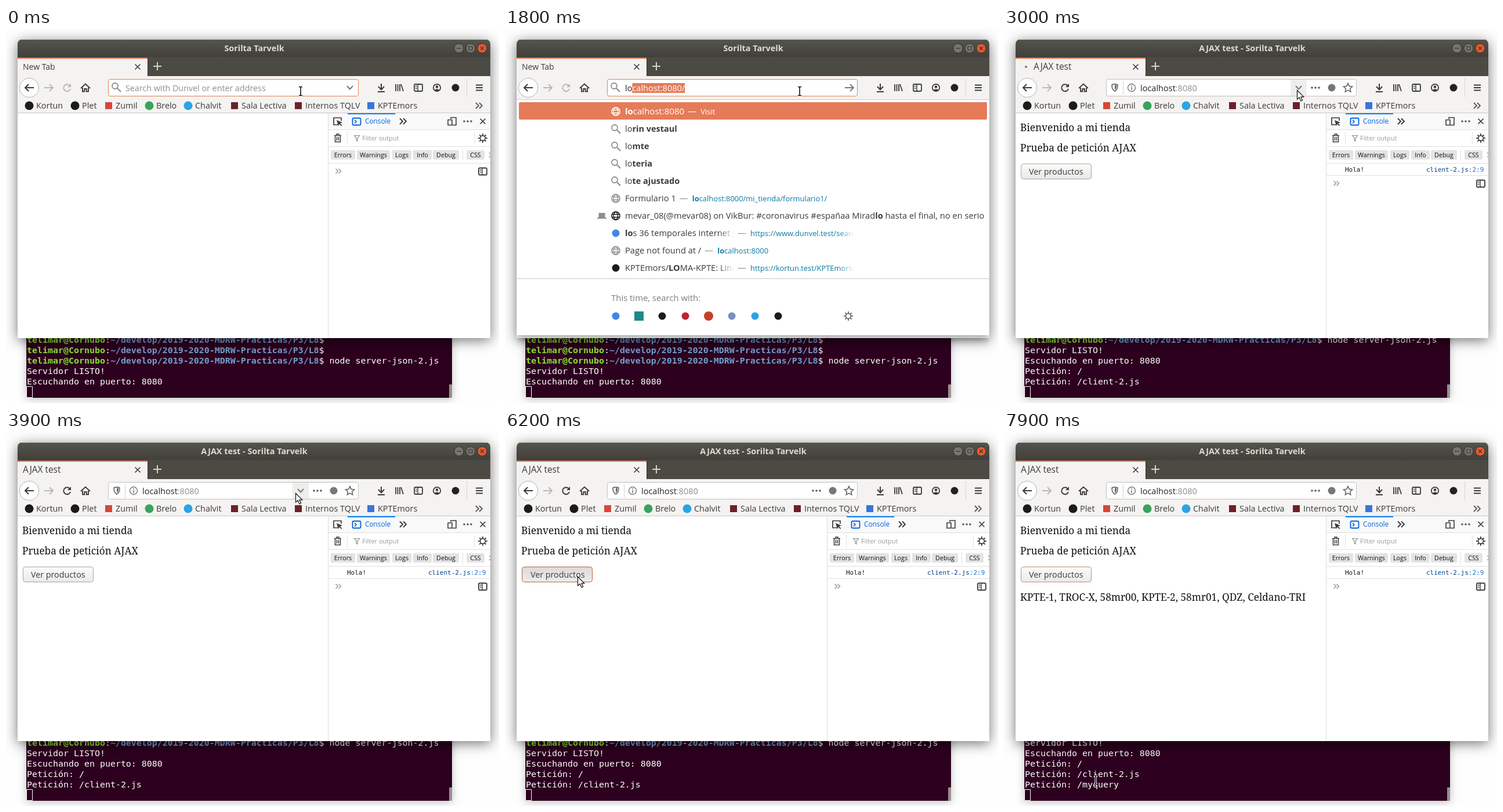
These frames come from a looping animation (850x647 px, 8000 ms). An HTML page with a canvas:

```html
<!DOCTYPE html>
<html lang="en">
<head>
<meta charset="utf-8">
<title>Browser request demo</title>
<style>
html, body { margin: 0; width: 100%; height: 100%; overflow: hidden; background: #fefefe; }
canvas { display: block; }
</style>
</head>
<body>
<canvas id="stage" width="850" height="647"></canvas>
<script>
const c = document.getElementById('stage').getContext('2d');
const LOOP = 8000;
const UI = '"Open Sans", "Noto Sans", sans-serif';
const MONO = '"DejaVu Sans Mono", monospace';
const SERIF = '"Noto Serif", serif';
const INK = '#3b3b3b', GREY = '#8d8d8d', ORANGE = '#e57b58', LINK = '#0b79a5';
const APP = 'Sorilta Tarvelk';

// ---- helpers ----
// Text is centred on y; returns the x where it ends.
function text(s, x, y, size = 14.5, color = INK, weight = 400, font = UI) {
  c.font = `${weight} ${size}px ${font}`;
  c.fillStyle = color;
  c.fillText(s, x, Math.round(y + size * .355));
  return x + c.measureText(s).width;
}
function rect(x, y, w, h, color) {
  c.fillStyle = color;
  c.fillRect(x, y, w, h);
}
function box(x, y, w, h, r, fill, stroke, lw = 1) {
  c.beginPath();
  c.roundRect(x, y, w, h, r);
  if (fill) { c.fillStyle = fill; c.fill(); }
  if (stroke) { c.strokeStyle = stroke; c.lineWidth = lw; c.stroke(); }
}
function disc(x, y, r, fill, stroke, lw = 1) {
  c.beginPath();
  c.arc(x, y, r, 0, 7);
  if (fill) { c.fillStyle = fill; c.fill(); }
  if (stroke) { c.strokeStyle = stroke; c.lineWidth = lw; c.stroke(); }
}
function line(d, x, y, color = INK, lw = 2) {
  c.save();
  c.translate(x, y);
  c.strokeStyle = color;
  c.lineWidth = lw;
  c.stroke(new Path2D(d));
  c.restore();
}
function shape(d, x, y, color) {
  c.save();
  c.translate(x, y);
  c.fillStyle = color;
  c.fill(new Path2D(d));
  c.restore();
}
function clipped(x, y, w, h, draw) {
  c.save();
  c.beginPath();
  c.rect(x, y, w, h);
  c.clip();
  draw();
  c.restore();
}
function vgrad(y0, y1, a, b) {
  const g = c.createLinearGradient(0, y0, 0, y1);
  g.addColorStop(0, a);
  g.addColorStop(1, b);
  return g;
}
function fadeRight(x, y, w) {
  const g = c.createLinearGradient(x - w, 0, x, 0);
  g.addColorStop(0, 'rgba(255,255,255,0)');
  g.addColorStop(1, '#fff');
  rect(x - w, y - 13, w, 26, g);
}
function shadowed(blur, dy, color, draw) {
  c.save();
  c.shadowBlur = blur;
  c.shadowOffsetY = dy;
  c.shadowColor = color;
  draw();
  c.restore();
}
// Text whose matches of term are bold.
function marked(s, term, x, y, size, color) {
  for (const part of s.split(new RegExp(`(${term})`, 'gi')))
    if (part) x = text(part, x, y, size, color, part.toLowerCase() === term ? 700 : 400);
  return x;
}

// ---- icons ----
const CROSS = 'M-4.5 -4.5L4.5 4.5M4.5 -4.5L-4.5 4.5';
const CHEVRON = 'M-5 -3L0 2.5L5 -3';
const MORE = 'M-5 -5L0 0L-5 5M1 -5L6 0L1 5';
const ARROW = 'M-7 0H8M2 -6L8 0L2 6';
function globe(x, y, color) {
  disc(x, y, 7, null, color, 1.6);
  line('M-7 -2.5H7M-7 2.5H7M0 -7C-5 -3 -5 3 0 7C5 3 5 -3 0 -7', x, y, color, 1.3);
}
function lens(x, y) {
  disc(x - 2, y - 2, 5, null, GREY, 1.8);
  line('M2 2L8 8', x, y, GREY, 2.2);
}
function gear(x, y, color) {
  for (let i = 0; i < 8; i++) {
    const a = i * Math.PI / 4, u = Math.cos(a), v = Math.sin(a);
    line(`M${u * 4} ${v * 4}L${u * 8} ${v * 8}`, x, y, color, 1.8);
  }
  disc(x, y, 4.4, null, color, 1.6);
}
function dots(x, y, r = 1.8) {
  for (const dx of [-6, 0, 6]) disc(x + dx, y, r, '#5a5a5a');
}
function sidebar(x, y) {
  box(x - 7, y - 6, 14, 12, 2, null, INK, 1.8);
  line('M-1 -6V6M-5 -2.5H-2.5M-5 1H-2.5', x, y, INK, 1.4);
}
function star(x, y, r, fill, stroke) {
  c.beginPath();
  for (let i = 0; i < 10; i++) {
    const a = i * Math.PI / 5 - Math.PI / 2, q = i % 2 ? r * .48 : r;
    c.lineTo(x + q * Math.cos(a), y + q * Math.sin(a));
  }
  c.closePath();
  if (fill) { c.fillStyle = fill; c.fill(); }
  else { c.strokeStyle = stroke; c.lineWidth = 1.6; c.stroke(); }
}
function square(x, y, color, r = 6.5) { rect(x - r, y - r, 2 * r, 2 * r, color); }

// ---- terminal ----
const PROMPT = ['telimar@Cornubo', ':', '~/develop/2019-2020-MDRW-Practicas/P3/L8', '$'];
const LOG = ['$', '$', '$ node server-json-2.js', 'Servidor LISTO!', 'Escuchando en puerto: 8080',
  'Petición: /', 'Petición: /client-2.js', 'Petición: /myquery'];

function terminal(t) {
  shadowed(14, 2, 'rgba(0,0,0,.25)', () => rect(35, 500, 734, 138, '#2c001e'));
  const end = t < 2700 ? 5 : t < 6400 ? 7 : 8;
  LOG.slice(end - 5, end).forEach((s, i) => {
    const y = 538 + 18 * i, put = (q, x, col, w) => text(q, x, y, 14.95, col, w, MONO);
    if (s[0] !== '$') return put(s, 36, '#fff');
    let x = put(PROMPT[0], 36, '#8ae234', 700);
    x = put(PROMPT[1], x, '#fff');
    x = put(PROMPT[2], x, '#729fcf', 700);
    put(s, x, '#fff');
  });
  box(35.5, 618.5, 10, 19, 0, null, '#fff');
  rect(764, 615, 5, 23, '#96908f');
}

// ---- browser chrome ----
function frame(t) {
  const loaded = t >= 2700;
  shadowed(22, 4, 'rgba(0,0,0,.55)', () => box(20, 20, 815, 515, [7, 7, 0, 0], '#fff'));
  box(20, 20, 815, 31, [7, 7, 0, 0], vgrad(20, 50, '#55544c', '#403f3a'));
  rect(24, 20, 807, 1, '#65645d');
  rect(20, 50, 815, 33, '#4b4a43');
  c.textAlign = 'center';
  text(loaded ? 'AJAX test - ' + APP : APP, 428, 35, 14.4, '#dfdbd2', 700);
  c.textAlign = 'left';
  ['M-4 0H4', 'M-3 -3H3V3H-3Z', 'M-3 -3L3 3M3 -3L-3 3'].forEach((d, i) => {
    disc(781 + 20 * i, 35, 8, i < 2 ? '#77756d' : '#e95a31', '#34332f');
    line(d, 781 + 20 * i, 35, '#34332f', 1.2);
  });

  rect(20, 51, 224, 32, '#f4f3f1');
  rect(20, 51, 224, 2, '#e6724a');
  rect(244, 52, 1, 31, '#37362f');
  if (!loaded) text('New Tab', 29, 67, 14);
  else if (t < 3300) {
    disc(32 + (t - 2700) / 50, 67, 2, '#777');
    text('AJAX test', 51, 67, 15.4);
  } else text('AJAX test', 29, 67, 15.4);
  line(CROSS, 227, 67, INK, 1.6);
  line('M-7 0H7M0 -7V7', 261, 66, '#d6d3cb', 2);

  rect(20, 83, 815, 64, '#f4f3f1');
  disc(40, 103, 16.5, '#fff', '#b5b2ad');
  line('M8 0H-7M-1 -6L-7 0L-1 6', 40, 103);
  line(ARROW, 73, 103, '#b9b8b5');
  const reload = loaded ? INK : '#b9b8b5';
  line('M5 -3.5A6 6 0 1 0 6 2', 105, 103, reload);
  shape('M7 -7V-1H1Z', 105, 103, reload);
  line('M-8 1L0 -6.5L8 1M-5 0V6.5H-1.7V2H1.7V6.5H5V0', 137, 103, INK, 1.9);

  line('M0 -7V3M-5 -2L0 3.5L5 -2M-6 7H6', 647, 103);
  line('M-6 -6V6M-2.5 -6V6M1 -6V6M3 -6L7 6', 678, 103, INK, 1.8);
  sidebar(711, 103);
  disc(743, 103, 6.2, null, INK, 1.8);
  disc(743, 101.5, 2.3, INK);
  shape('M-4.5 4.5Q0 0 4.5 4.5Q0 8 -4.5 4.5', 743, 103, INK);
  disc(775, 103, 6.5, '#222');
  rect(794, 87, 1, 32, '#d9d7d3');
  line('M-6 -4.5H6M-6 0H6M-6 4.5H6', 816, 103, INK, 1.8);

  const marks = [
    ['Kortun', 40, '#1b1b1b', 1], ['Plet', 119, '#1b1b1b', 1], ['Zumil', 177, '#d8463a'],
    ['Brelo', 247, '#39a35b', 1], ['Chalvit', 314, '#2ba3e4', 1], ['Sala Lectiva', 394, '#6e2028'],
    ['Internos TQLV', 504, '#6e2028'], ['KPTEmors', 629, '#3a74d8']];
  for (const [name, x, color, round] of marks) {
    if (round) disc(x, 134, 7.5, color);
    else square(x, 134, color, 6);
    text(name, x + 12, 134, 14.4);
  }
  line(MORE, 815, 134, '#5a5a5a', 1.8);
  rect(20, 146, 815, 1, '#cbc8c3');
}

function urlbar(t) {
  const loaded = t >= 2700;
  box(176.5, 88.5, 431, 29, 3, '#fff', loaded ? '#c4c1bc' : '#dd8058');
  if (loaded) {
    shape('M-5.5 -6Q0 -8 5.5 -6Q7 3 0 7Q-7 3 -5.5 -6', 191, 103, '#6b6b6b');
    shape('M-3.8 -4.6Q0 -6 3.8 -4.6Q4.7 2 0 5Q-4.7 2 -3.8 -4.6', 191, 103, '#fff');
    shape('M0 -4.6Q2 -5 3 -4.2Q3.6 1.8 0 3.8Z', 191, 103, '#6b6b6b');
    rect(205, 92, 1, 23, '#d0d0d0');
    disc(220, 103, 6.5, null, '#777', 1.4);
    line('M0 -1V4M0 -4V-2.3', 220, 103, '#777', 1.6);
    const x = text('localhost', 235, 104, 14.5, '#222');
    text(':8080', x, 104, 14.5, GREY);
    if (t < 4000) {
      rect(494, 89, 28, 28, '#eeeeec');
      line(CHEVRON, 508, 103, '#777');
    }
    dots(537, 103);
    disc(565, 103, 6.5, '#777');
    star(593, 103.5, 8, null, '#666');
    return;
  }
  lens(190, 102);
  if (t < 1200) {
    text('Search with Dunvel or enter address', 206, 104, 14.3, '#8f8f8f');
    line(CHEVRON, 593, 103, '#777');
    if (t >= 1000) rect(207, 95, 1, 17, '#111');
    return;
  }
  const typed = t < 1400 ? 'l' : 'lo', rest = 'localhost:8080/'.slice(typed.length);
  const x = text(typed, 207, 104, 14.5, '#222');
  rect(x, 95, c.measureText(rest).width, 17, ORANGE);
  text(rest, x, 104, 14.5, '#fff');
  line(ARROW, 593, 103, '#777', 1.8);
}

// ---- devtools and page ----
function devtools(t) {
  rect(555, 147, 1, 388, '#dcdcdf');
  rect(556, 147, 279, 28, '#f9f9fa');
  for (const y of [175, 204, 233]) rect(556, y, 279, 1, '#e0e0e2');
  line('M1 6H-7V-6H6V-1', 572, 161, INK, 1.7);
  shape('M-2 -2L8 2L4 3.5L7.5 7L6 8L2.5 4.8L1 8Z', 572, 161, INK);
  rect(589, 147, 82, 2, '#0a84ff');
  box(597.5, 155.5, 14, 12, 2, null, '#0060df', 1.8);
  line('M-3 -3L0 0L-3 3', 604, 161.5, '#0060df', 1.6);
  text('Console', 619, 161, 11.8, '#0060df');
  line(MORE, 684, 161, INK, 1.9);
  line('M-2 -4V-6.5H7V6.5H1M-7 -2.5H0V6.5H-7Z', 769, 161, INK, 1.6);
  dots(796, 161);
  line(CROSS, 822, 161, INK, 1.7);

  line('M-6 -4.5H6M-2 -5V-7H2V-5M-4.5 -4V6.5H4.5V-4M-1.5 -2V4M1.5 -2V4', 572, 190, INK, 1.5);
  rect(588, 179, 1, 22, '#e0e0e2');
  line('M-4.5 -4.5H4.5L1 0V5L-1 4V0Z', 605, 190, GREY, 1.2);
  text('Filter output', 614, 190, 11, '#9b9b9b');
  rect(807, 179, 1, 22, '#e0e0e2');
  gear(822, 190, INK);

  const tags = [['Errors', 560, 42], ['Warnings', 605, 57], ['Logs', 666, 33], ['Info', 702, 32],
    ['Debug', 736, 45], ['CSS', 794, 31]];
  c.textAlign = 'center';
  for (const [s, x, w] of tags) {
    box(x, 211, w, 16, 2, '#e3e3e5');
    text(s, x + w / 2, 219, 10.7, '#111');
  }
  c.textAlign = 'left';
  rect(787, 209, 1, 20, '#e0e0e2');
  line('M0 -4L2 -2M0 4L2 2', 833, 219, '#555', 1);

  const logged = t >= 2900, y = logged ? 268 : 247;
  if (logged) {
    text('Hola!', 588, 244, 11, '#111', 400, MONO);
    const x = text('client-2.js', 728, 244, 11, '#00408f', 400, MONO);
    text(':2:9', x, 244, 11, '#1571d8', 400, MONO);
    rect(556, 254, 279, 1, '#e0e0e2');
  }
  line('M-4.5 -4L-.5 0L-4.5 4M.5 -4L4.5 0L.5 4', 573, y, '#999', 1.5);
  sidebar(822, y + .5);
}

function page(t) {
  if (t < 2700) return;
  const say = (s, y) => text(s, 28, y, 17.2, '#111', 400, SERIF);
  say('Bienvenido a mi tienda', 172);
  say('Prueba de petición AJAX', 207);
  const down = t >= 6200 && t < 6400, over = t >= 5700 && t < 7400;
  const face = down ? vgrad(235, 261, '#dcdad7', '#eeedeb') : vgrad(235, 261, over ? '#fff' : '#fbfbfa', '#ebe9e7');
  box(29.5, 234.5, 121, 26, 4, face, down ? '#b5664b' : t >= 6400 ? '#c08d78' : '#aaa59f');
  text('Ver productos', down ? 44 : 43, down ? 248 : 247.5, 14.3);
  if (t >= 6500) say('KPTE-1, TROC-X, 58mr00, KPTE-2, 58mr01, QDZ, Celdano-TRI', 287);
  if (t < 3000) {
    box(19.5, 513.5, 323, 22, [0, 4, 0, 0], '#f2f1ef', '#bdbab5');
    text('Transferring data from localhost…', 24, 525, 14.5);
  }
}

// ---- address suggestions ----
const grey = (x, y) => globe(x, y, GREY), black = (x, y) => globe(x, y, '#111');
const round = color => (x, y) => disc(x, y, 6.5, color);
const FORM = [grey, 'Formulario 1', 'localhost:8000/mi_tienda/formulario1/'];
const CLIP = [black, 'mevar_08(@mevar08) on VikBur: #coronavirus #españaa Miradlo hasta el final, no en serio'];
const HITS = [round('#4285e8'), 'los 36 temporales internet gratis', 'https://www.dunvel.test/search?q='];
const LOST = [grey, 'Page not found at /', 'localhost:8000'];
const CLUB = [(x, y) => square(x, y, '#3a74d8'), 'KPTEmors', 'https://groups.dunvel.test/forum/#!forum/kpte-mors'];
const REPO = [round('#1b1b1b'), 'KPTEmors/LOMA-KPTE: Lineas', 'https://kortun.test/KPTEmors/LOMA'];
const IDEAS = ['rin vestaul', 'mte', 'teria', 'te ajustado'].map(s => [lens, s]);

function suggestion([icon, title, url], y, term) {
  icon(191, y);
  if (icon === lens) return text(title, text('lo', 207, y, 14.5), y, 14.5, INK, 700);
  if (title === CLIP[1]) shape('M-5.5 -5H5.5V3H8V5H-8V3H-5.5Z', 167, y, GREY);
  if (title === CLUB[1]) star(167, y, 8.5, GREY);
  const limit = url ? 395 : 835;
  let end;
  clipped(200, y - 14, limit - 200, 28, () => {
    end = marked(title, term, 207, y, 14.7, INK);
  });
  if (!url) return;
  if (end > limit) fadeRight(end = limit, y, 26);
  text('—', end + 6, y, 14.7, GREY);
  clipped(end, y - 14, 602 - end, 28, () => {
    if (marked(url, term, end + 28, y, 12.9, LINK) > 602) fadeRight(602, y, 26);
  });
}

function popup(t) {
  if (t < 1200 || t >= 2700) return;
  const term = t < 1400 ? 'l' : 'lo', tall = t >= 1500, sep = tall ? 432 : 312;
  clipped(20, 123, 815, 442, () =>
    shadowed(14, 3, 'rgba(0,0,0,.45)', () => rect(20, 123, 815, sep - 25, '#fff')));
  rect(20, 123, 815, 1, '#cfccc8');
  box(24, 128, 807, 30, 2, ORANGE);
  globe(191, 144, '#fff');
  const end = marked('localhost:8080', term, 207, 144, 15, '#fff');
  text('—', end + 6, 144, 14.7, '#fff');
  text('Visit', end + 28, 144, 13, '#fff');

  const rows = !tall ? [FORM, CLIP, HITS, LOST, CLUB]
    : t < 1800 ? [FORM, CLIP, HITS, LOST, REPO]
    : [...IDEAS, FORM, CLIP, HITS, LOST, REPO];
  rows.forEach((r, i) => suggestion(r, 174 + 30 * i, term));

  rect(20, sep, 815, 1, '#c9c9c9');
  text('This time, search with:', 183, sep + 34, 14.9, '#808080');
  const y = sep + 65;
  ['#4285e8', '#1d8a86', '#1b1b1b', '#c3202f', '#c8402a', '#7a8fc4', '#2ba3e4', '#1b1b1b'].forEach((color, i) =>
    i === 1 ? square(231, y, color, 8) : disc(191 + 40 * i, y, i === 4 ? 8 : 6.5, color));
  gear(592, y, '#666');
}

// ---- mouse ----
const PATH = [[2700, 505, 107], [3800, 505, 107], [3900, 499, 107], [4000, 486, 125], [4100, 468, 155],
  [4200, 455, 176], [4300, 455, 176], [4400, 450, 184], [4700, 350, 265], [5000, 245, 313], [5200, 220, 308],
  [5500, 160, 275], [5800, 125, 251], [7200, 125, 251], [7300, 131, 262], [7600, 185, 430], [7900, 158, 602]];

function mouse(t) {
  if (t < 2700) return beam(508, 109);
  const i = Math.max(1, PATH.findIndex(k => k[0] >= t));
  const [t0, x0, y0] = PATH[i - 1], [t1, x1, y1] = PATH[i];
  const k = (t - t0) / (t1 - t0), x = x0 + (x1 - x0) * k, y = y0 + (y1 - y0) * k;
  if (y > 535) return beam(x, y);
  const d = 'M.5 .5V16L4.2 12.7L7 19L9.6 17.8L6.9 11.8H11.8Z';
  shape(d, x, y, '#fff');
  line(d, x, y, '#111', 1.2);
}
function beam(x, y) {
  const d = 'M-3 -7.5H-1L0 -6.5L1 -7.5H3M0 -6.5V6.5M-3 7.5H-1L0 6.5L1 7.5H3';
  line(d, x, y, '#fff', 3.4);
  line(d, x, y, '#111', 1.6);
}

function draw(now) {
  const t = Math.floor(now % LOOP / 100) * 100;
  rect(0, 0, 850, 647, '#fefefe');
  terminal(t);
  frame(t);
  urlbar(t);
  devtools(t);
  page(t);
  popup(t);
  mouse(t);
  requestAnimationFrame(draw);
}
requestAnimationFrame(draw);
</script>
</body>
</html>
```
